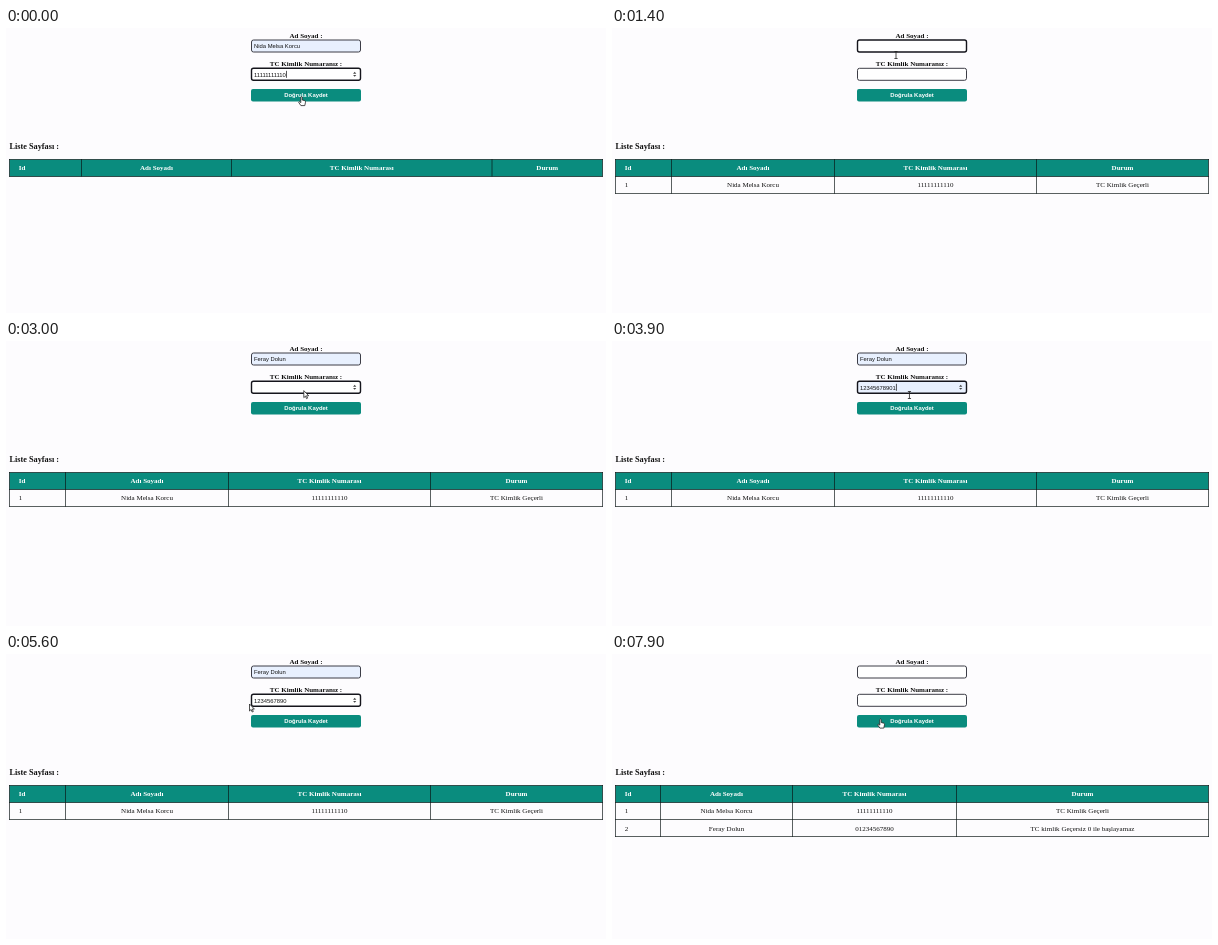
These frames come from a looping animation (600x285 px, 8000 ms). An HTML page with a canvas:

```html
<!DOCTYPE html>
<html lang="tr">
<head>
<meta charset="utf-8">
<style>
html, body { margin: 0; overflow: hidden; background: #fdfcfe; }
canvas { display: block; }
</style>
</head>
<body>
<canvas id="stage" width="600" height="285"></canvas>
<script>
const c = document.getElementById('stage').getContext('2d');
const LOOP = 8000, TEAL = '#0a8c7e', AUTOFILL = '#e8f0fe';
const SERIF = '"Liberation Serif", "Times New Roman", serif';
const SANS = '"Liberation Sans", Arial, sans-serif';
const people = [
  ['1', 'Nida Melsa Korcu', '11111111110', 'TC Kimlik Geçerli'],
  ['2', 'Feray Dolun', '01234567890', 'TC kimlik Geçersiz 0 ile başlayamaz']
];
const columns = [
  [3.5, 75.5, 225.5, 486, 596.5],
  [3.5, 59.5, 222.5, 424.5, 596.5],
  [3.5, 48.5, 180.5, 344.5, 596.5]
];

// Each step holds from its time until the next one.
const rowSteps = [[0, 0], [400, 1], [7800, 2]];
const nameSteps = [[0, people[0][1]], [400, ''], [1800, people[1][1]], [7800, '']];
const idSteps = [[0, '11111111110'], [400, ''], [3500, '12345678901'],
  [4400, '1234567890'], [7000, '01234567890'], [7800, '']];
const focusSteps = [[0, 2], [400, 0], [1300, 1], [2500, 2], [7600, 0]];
const shapeSteps = [[0, 'hand'], [700, 'arrow'], [1100, 'beam'], [1700, 'arrow'],
  [2300, 'beam'], [2900, 'arrow'], [3600, 'beam'], [5200, 'arrow'], [5900, 'beam'],
  [7500, 'hand']];
const pointerPath = [[0, 295.5, 69], [500, 295.5, 69], [1200, 284, 27], [1500, 284, 27],
  [1950, 297.5, 47], [2500, 298, 47], [3700, 297.5, 54], [4700, 297, 54],
  [5500, 243.5, 50], [5700, 243.5, 50], [6300, 251, 48], [7300, 251, 48],
  [7700, 268.5, 65.5], [8000, 268.5, 65.5]];

const at = (steps, t) => steps.filter(s => s[0] <= t).pop()[1];

function pointerAt(t) {
  const i = pointerPath.findIndex(p => p[0] > t);
  const [t0, x0, y0] = pointerPath[i - 1], [t1, x1, y1] = pointerPath[i];
  const u = (t - t0) / (t1 - t0), k = u * u * (3 - 2 * u);
  return [x0 + (x1 - x0) * k, y0 + (y1 - y0) * k];
}

function text(s, x, y, font, color = '#111', align = 'center') {
  c.font = font;
  c.fillStyle = color;
  c.textAlign = align;
  c.fillText(s, x, y);
}

function box(x, y, w, h, r, fill, stroke, width) {
  c.beginPath();
  c.roundRect(x, y, w, h, r);
  c.fillStyle = fill;
  c.fill();
  if (!stroke) return;
  c.strokeStyle = stroke;
  c.lineWidth = width;
  c.stroke();
}

function field(y, value, filled, focused, caret) {
  box(245.5, y, 109, 12, 2, filled ? AUTOFILL : '#fff',
    focused ? '#15151c' : '#3c3d46', focused ? 1.4 : 1);
  text(value, 248, y + 8.2, '5.85px ' + SANS, '#111', 'left');
  if (caret) {
    c.fillStyle = '#111';
    c.fillRect(248.2 + c.measureText(value).width, y + 2.5, 0.7, 7);
  }
}

function spinner(x, y) {
  c.fillStyle = '#444';
  for (const d of [-1, 1]) {
    c.beginPath();
    c.moveTo(x - 1.6, y + d * 0.6);
    c.lineTo(x + 1.6, y + d * 0.6);
    c.lineTo(x, y + d * 2.5);
    c.fill();
  }
}

function table(rows) {
  const xs = columns[rows], bottom = 148.5 + rows * 17.2;
  c.fillStyle = TEAL;
  c.fillRect(3.5, 131.5, 593, 17);
  const lines = [['Id', 'Adı Soyadı', 'TC Kimlik Numarası', 'Durum'], ...people.slice(0, rows)];
  lines.forEach((cells, r) => cells.forEach((s, i) => {
    const x = i ? (xs[i] + xs[i + 1]) / 2 : 12.7;
    text(s, x, 142.3 + r * 17.1, (r ? '' : 'bold ') + '7.03px ' + SERIF,
      r ? '#111' : '#fff', i ? 'center' : 'left');
  }));
  c.beginPath();
  for (const x of xs) {
    c.moveTo(x, 131);
    c.lineTo(x, bottom);
  }
  for (const y of [131.5, ...lines.map((_, r) => Math.round(148 + r * 17.2) + 0.5)]) {
    c.moveTo(3, y);
    c.lineTo(597, y);
  }
  c.strokeStyle = 'rgba(10,20,20,.75)';
  c.lineWidth = 0.9;
  c.stroke();
}

const outlines = {
  arrow: 'M0 0V7L1.6 5.5L2.7 8L3.8 7.5L2.7 5.1H4.9Z',
  hand: 'M-.7 0Q0-.9 .7 0V3L3.4 3.7Q4.2 4 4 5.2L3.3 8.6H-.6L-2.8 5.4Q-2.6 4.4-1.7 4.8L-.7 5.6Z',
  beam: 'M-1.6-3.5H1.6M0-3.5V3.5M-1.6 3.5H1.6'
};

function pointer(shape, x, y) {
  const path = new Path2D(outlines[shape]);
  c.save();
  c.translate(x, y);
  c.lineWidth = 0.8;
  c.strokeStyle = '#222';
  if (shape !== 'beam') {
    c.fillStyle = '#fff';
    c.fill(path);
  }
  c.stroke(path);
  c.restore();
}

function draw(t) {
  const name = at(nameSteps, t), id = at(idSteps, t), focus = at(focusSteps, t);
  const bold = 'bold 7.03px ' + SERIF;
  c.fillStyle = '#fdfcfe';
  c.fillRect(0, 0, 600, 285);
  text('Ad Soyad :', 300, 9.8, bold);
  field(12, name, name, focus === 1, false);
  text('TC Kimlik Numaranız :', 300, 38.4, bold);
  const caret = focus === 2 && (t < 400 || t > 2500 && t < 5500 && t % 1000 >= 500);
  field(40.3, id, id === '12345678901', focus === 2, caret);
  if (focus === 2) spinner(348.7, 46.3);
  box(245, 61, 110, 12.4, 2, TEAL);
  text('Doğrula Kaydet', 300, 69.2, 'bold 5.9px ' + SANS, '#fff');
  text('Liste Sayfası :', 3.5, 121, 'bold 8.25px ' + SERIF, '#111', 'left');
  table(at(rowSteps, t));
  pointer(at(shapeSteps, t), ...pointerAt(t));
}

function tick() {
  draw(Math.floor(performance.now() % LOOP / 100) * 100);
  requestAnimationFrame(tick);
}
tick();
</script>
</body>
</html>
```
